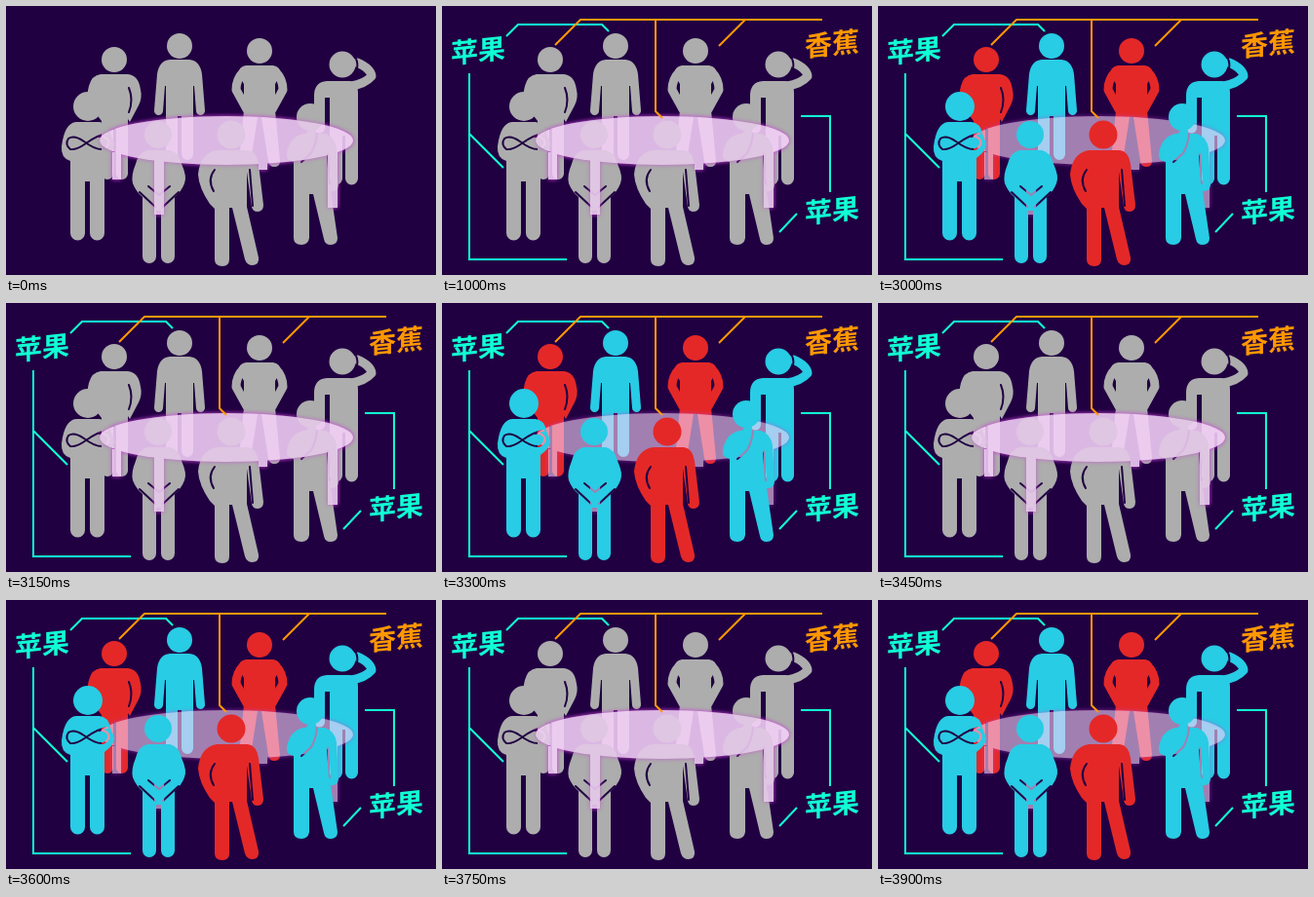
Write an HTML page that moves like this. It is 441 px wide and 276 px high and loops after 6.9 s.

```html
<!DOCTYPE html>
<html lang="zh">
<head>
<meta charset="utf-8">
<title>苹果与香蕉</title>
<style>
  html, body { margin: 0; width: 100%; height: 100%; overflow: hidden; background: #210042; }
  svg { display: block; width: 100%; height: 100%; }

  .cyan { --team: #28cce4; }
  .red { --team: #e42828; }
  .cyan, .red { fill: currentColor; color: #adadad; animation: team 6.9s step-end infinite; }
  .arm { fill: none; stroke: currentColor; stroke-width: 9; stroke-linecap: round; stroke-linejoin: round; }
  .gap { fill: none; stroke: #000; stroke-width: 2; stroke-linecap: round; stroke-linejoin: round; }

  .table { fill: #f4d0f8; filter: blur(.6px) drop-shadow(0 0 2px #c445d2); }
  .under { opacity: .61; }
  .over { opacity: .7; }
  .veil { animation: veil 6.9s step-end infinite; }

  .labels { animation: labels 6.9s step-end infinite; }
  .labels path { fill: none; stroke: currentColor; stroke-width: 2; }
  .labels text {
    fill: currentColor;
    font: 700 28px "Noto Sans CJK SC", "Noto Sans CJK", sans-serif;
    transform: skewY(-6deg);
    transform-box: fill-box;
    transform-origin: center;
  }
  .apple { color: #10ffd4; }
  .banana { color: #ff9800; }

  @keyframes labels { 0% { opacity: 0; } 14.492%, 100% { opacity: 1; } }
  @keyframes team {
    0%, 45.652%, 50%, 54.347% { color: #adadad; }
    43.478%, 47.826%, 52.173%, 56.521%, 100% { color: var(--team); }
  }
  @keyframes veil {
    0%, 45.652%, 50%, 54.347% { opacity: 1; }
    43.478%, 47.826%, 52.173%, 56.521%, 100% { opacity: 0; }
  }
</style>
</head>
<body>
<svg viewBox="0 0 441 276" preserveAspectRatio="none">
  <defs>
    <mask id="backGaps" maskUnits="userSpaceOnUse" x="0" y="0" width="441" height="276">
      <rect width="441" height="276" fill="#fff"/>
      <g class="gap">
        <path d="M126 84Q131 96 126 109"/>
        <path d="M355 49A15 15 0 0 1 357 70"/>
      </g>
    </mask>
    <mask id="frontGaps" maskUnits="userSpaceOnUse" x="0" y="0" width="441" height="276">
      <rect width="441" height="276" fill="#fff"/>
      <g class="gap">
        <path d="M104 131Q94 132 82 141Q72 148 66 147Q60 142 64 136Q70 132 80 139Q92 148 100 147Q107 143 105 138Q102 133 96 134"/>
        <path d="M146 185L157 194L168 185M137 191L153 206M177 191L161 206"/>
        <path d="M214 168Q206 178 213 190M250 168L253 205"/>
        <path d="M303 160L313 151Q319 140 319 128M330 152L332 182"/>
      </g>
    </mask>
    <g id="table" class="table">
      <ellipse cx="226" cy="138" rx="130" ry="25"/>
      <path d="M109 150h9v28h-9zM152 158h10v56h-10zM259 158h9v10h-9zM330 150h10v57h-10z"/>
    </g>
  </defs>

  <g mask="url(#backGaps)">
    <g class="red">
      <circle cx="111" cy="55" r="13"/>
      <path d="M97 70h28q11 1 13 16q2 8-2 16l-9 17-2-3V172a6 6 0 0 1-12 0V126h-3V172a6 6 0 0 1-12 0V118L86 102Q82 92 85 82Q88 71 97 70Z"/>
    </g>
    <g class="cyan">
      <circle cx="178" cy="41" r="13"/>
      <path d="M168 55h20q11 1 13 15l3 37a4.5 4.5 0 0 1-9 1l-2-26h-1V152a6 6 0 0 1-12 0V113h-4V152a6 6 0 0 1-12 0V82h-1l-2 26a4.5 4.5 0 0 1-9-1l3-37q2-14 13-15Z"/>
    </g>
    <g class="red">
      <circle cx="260" cy="46" r="13"/>
      <path d="M246 61h28q7 1 8 9l-6 10v27l5 52q0 6-6 6-5 0-6-6l-7-45h-4l-7 45q-1 6-7 6-6 0-5-6l5-52V80l-6-10q1-8 8-9Z"/>
      <path class="arm" d="M244 67Q236 75 236 86L247 106M276 67Q284 75 284 86L273 106"/>
    </g>
    <g class="cyan">
      <circle cx="345" cy="60" r="13.5"/>
      <path d="M329 77h24q8 2 8 12V177a6.5 6.5 0 0 1-13 0V133h-3V177a6.5 6.5 0 0 1-13 0V94h-5V125a5.5 5.5 0 0 1-11 0V92Q316 78 329 77Z"/>
      <path class="arm" d="M354 82Q368 80 375 72Q374 64 360 58"/>
    </g>
  </g>

  <g class="under"><use href="#table"/></g>

  <g mask="url(#frontGaps)">
    <g class="cyan">
      <circle cx="84" cy="103" r="15"/>
      <path d="M72 119h24q9 1 11 12l4 10q0 8-10 15V233a7.5 7.5 0 0 1-15 0V180h-5V233a7.5 7.5 0 0 1-15 0V159Q56 156 57 144Q60 120 72 119Z"/>
    </g>
    <g class="cyan">
      <circle cx="156" cy="132" r="14"/>
      <path d="M145 148h23q9 2 12 14 6 13 3 20-3 8-10 14V257a7 7 0 0 1-14 0V210h-5V257a7 7 0 0 1-14 0V196q-7-6-10-14-2-8 3-20 3-12 12-14Z"/>
    </g>
    <g class="red">
      <circle cx="231" cy="132" r="14.5"/>
      <path d="M216 148h32q9 1 11 14l5 42q0 7-6 7-5 0-6-5l-5-36v36l12 52q1 7-6 8-6 0-8-6l-13-53h-3v53q0 7-7 7-8 0-8-7V208l-5-5q-11-16-12-30q2-22 19-25Z"/>
    </g>
    <g class="cyan">
      <circle cx="312" cy="114" r="14"/>
      <path d="M305 131h22q10 3 12 15l2 38q-1 6-7 6h-1l7 48q0 7-7 7-6 0-7-6l-11-46h-4V238q-1 7-8 7-8 0-8-7V160q-8-1-7-9Q291 134 305 131Z"/>
      <path class="arm" d="M296 152L314 130"/>
    </g>
  </g>

  <g class="veil"><g class="over"><use href="#table"/></g></g>

  <g class="labels">
    <g class="apple">
      <path d="M66 31L78 19H164L171 26M28 69V260H128M28 131L63 166M368 113H398V191M364 213L346 232"/>
      <text x="9" y="56">苹果</text>
      <text x="372" y="220">苹果</text>
    </g>
    <g class="banana">
      <path d="M390 14H142L116 40M219 14V108L226 115M311 14L284 41"/>
      <text x="372" y="49">香蕉</text>
    </g>
  </g>
</svg>
</body>
</html>
```
